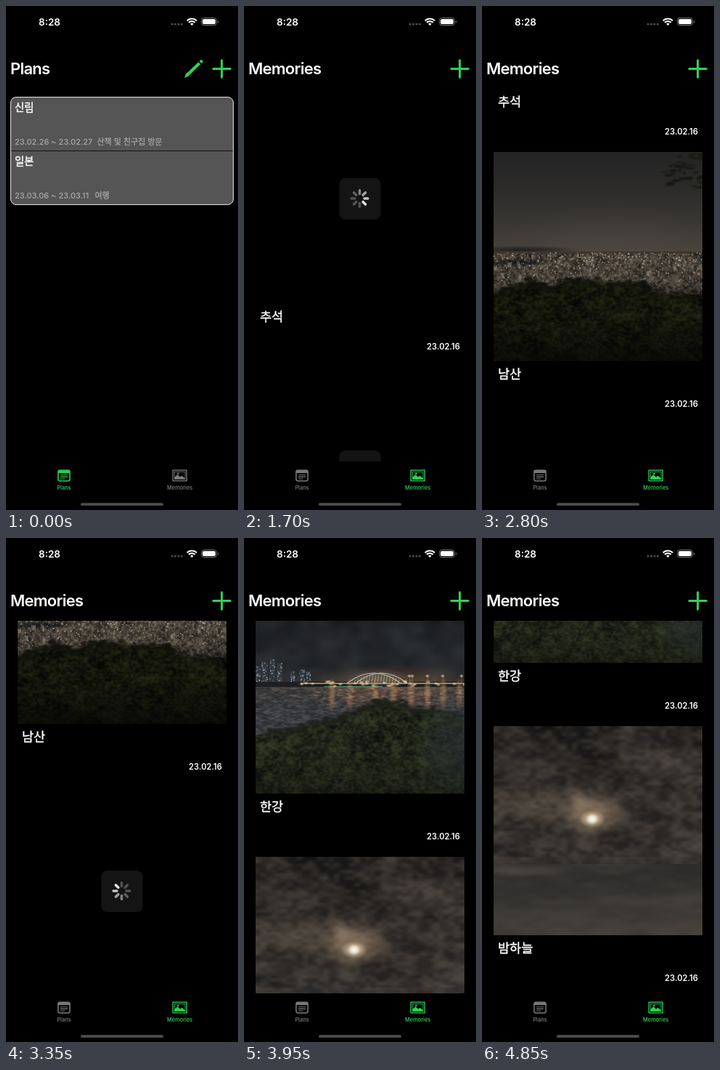
An HTML page with a canvas for the animation above (4900 ms loop, 320x694 px).

```html
<!DOCTYPE html>
<html lang="ko">
<head>
<meta charset="utf-8">
<title>Plans and Memories</title>
<style>
  html, body { margin: 0; width: 100%; height: 100%; overflow: hidden; background: #000; }
  #stage { position: relative; width: 320px; height: 694px; overflow: hidden; }
  #stage > svg { position: absolute; left: 0; top: 0; }
  #view { position: absolute; left: 0; top: 114px; width: 320px; height: 513px; overflow: hidden; }
  #photos { position: absolute; left: 16px; top: 8px; }
  canvas { position: absolute; left: 0; display: block; }
  text { font-family: Inter, "Noto Sans CJK KR", "Noto Sans CJK", sans-serif; fill: #fff; }
  .ko { font-family: "Noto Sans CJK KR", "Noto Sans CJK", sans-serif; font-weight: 400; stroke: #fff; stroke-width: .4px; }
  .title { font-size: 22px; font-weight: 600; letter-spacing: -.75px; }
  .plan { font-size: 14.3px; }
  .sub { font-size: 11px; font-weight: 500; fill: #a9a9a9; }
  .sub.ko { stroke: #a9a9a9; stroke-width: .25px; }
  .name { font-size: 17.5px; }
  .date { font-size: 11.2px; font-weight: 600; text-anchor: end; }
  .tab text { font-size: 7.4px; font-weight: 500; text-anchor: middle; fill: currentColor; }
</style>
</head>
<body>
<div id="stage">
  <div id="view"><div id="photos"></div></div>
  <svg width="320" height="694" viewBox="0 0 320 694" fill="none">
    <clipPath id="clip"><rect y="114" width="320" height="513"/></clipPath>

    <text x="60" y="27" font-size="13.5" font-weight="600" text-anchor="middle">8:28</text>
    <g fill="#4b4b4b">
      <circle cx="229" cy="25" r="1.6"/><circle cx="233.5" cy="25" r="1.6"/>
      <circle cx="238" cy="25" r="1.6"/><circle cx="242.4" cy="25" r="1.6"/>
    </g>
    <g stroke="#fff" stroke-width="2.1">
      <path d="M249.7 20.2a9.6 9.6 0 0 1 13.4 0M252 22.8a6.2 6.2 0 0 1 8.8 0"/>
      <path d="M254.2 24.6a3.2 3.2 0 0 1 4.4 0L256.4 27z" fill="#fff" stroke="none"/>
    </g>
    <rect x="269.5" y="16.5" width="21" height="10" rx="3.2" stroke="#777"/>
    <rect x="271" y="18" width="18" height="7" rx="2" fill="#fff"/>
    <path d="M292 20v3.4q1.3-.5 1.3-1.7t-1.3-1.7z" fill="#777"/>

    <text id="title" class="title" x="6" y="94"></text>
    <path d="M285.9 86.5h23.4M297.6 74.8v23.4" stroke="#30d158" stroke-width="3" stroke-linecap="round"/>

    <g id="plans">
      <path d="M246 99l2-5.2 17.4-16.6 3 3-17.2 16.6zM266.6 76.1l1.6-1.5q1.2-1 2.4.1l.6.6q1 1.1 0 2.2l-1.6 1.6z" fill="#30d158"/>
      <rect x="6.5" y="125.5" width="307" height="148" rx="7.5" fill="#555" stroke="#e8e8e8"/>
      <path d="M7 199.5h306" stroke="#111"/>
      <text class="ko plan" x="12" y="145">신림</text>
      <text class="sub" x="12" y="190.5">23.02.26 ~ 23.02.27</text>
      <text class="sub ko" x="125.5" y="190.5">산책 및 친구집 방문</text>
      <text class="ko plan" x="12" y="219">일본</text>
      <text class="sub" x="12" y="265">23.03.06 ~ 23.03.11</text>
      <text class="sub ko" x="122.5" y="265">여행</text>
    </g>

    <g clip-path="url(#clip)"><g id="feed"></g></g>

    <g class="tab" id="tabPlans">
      <rect x="71.9" y="639.3" width="16.2" height="14.6" rx="2.4" stroke="currentColor" stroke-width="1.5"/>
      <path d="M72 641.6h16" stroke="currentColor" stroke-width="3"/>
      <path d="M75 645.8h10M75 648.4h10M75 651h6.5" stroke="currentColor" stroke-width="1.1"/>
      <text x="80" y="665.6">Plans</text>
    </g>
    <g class="tab" id="tabMem">
      <rect x="230.2" y="639.2" width="19" height="14.6" stroke="currentColor" stroke-width="1.3"/>
      <rect x="232.4" y="641.4" width="14.6" height="10.2" stroke="currentColor" stroke-width=".8"/>
      <path d="M232.5 651.5v-2.7l4-3.6 3.6 3.3 2.4-1.8 4.4 3.6v1.2z" fill="currentColor"/>
      <circle cx="237.4" cy="644" r="1.3" fill="currentColor"/>
      <text x="239.7" y="665.6">Memories</text>
    </g>
    <rect x="103" y="684.3" width="114" height="3.8" rx="1.9" fill="#4c4c4c"/>
  </svg>
</div>
<script>
const LOOP = 4900, SWITCH = 650, LISTED = 1150, PITCH = 375, SIZE = 288;
const GREEN = '#30d158', GRAY = '#7c7c7c';
const $ = id => document.getElementById(id);

let seed = 7;
const rnd = (a = 0, b = 1) => {
  seed = (seed * 16807) % 2147483647;
  return a + (b - a) * seed / 2147483647;
};
const times = (n, fn) => { for (let i = 0; i < n; i++) fn(i); };

function blob(c, x, y, rx, ry, rgb, a) {
  c.save();
  c.translate(x, y);
  c.scale(rx, ry);
  const g = c.createRadialGradient(0, 0, 0, 0, 0, 1);
  g.addColorStop(0, `rgba(${rgb},${a})`);
  g.addColorStop(.5, `rgba(${rgb},${a * .62})`);
  g.addColorStop(1, `rgba(${rgb},0)`);
  c.fillStyle = g;
  c.fillRect(-1, -1, 2, 2);
  c.restore();
}
function fade(c, y0, y1, ...colors) {
  const g = c.createLinearGradient(0, y0, 0, y1);
  colors.forEach((k, i) => g.addColorStop(i / (colors.length - 1), k));
  c.fillStyle = g;
  c.fillRect(0, y0, SIZE, y1 - y0);
}
function dot(c, x, y, w, h, color) {
  c.fillStyle = color;
  c.fillRect(x, y, w, h);
}
function trace(c, pts) {
  c.beginPath();
  pts.forEach(p => c.lineTo(...p));
  c.closePath();
}

// cloudy texture: layers of random pixels, each finer than the last, smoothly enlarged
function mottle(c, y0, y1, cells, layers, light, dark, a, flat = 1) {
  c.imageSmoothingQuality = 'high';
  times(layers, i => {
    const tile = document.createElement('canvas');
    const w = tile.width = cells * 2 ** i;
    const h = tile.height = Math.max(2, Math.round(w * flat * (y1 - y0) / SIZE));
    const t = tile.getContext('2d');
    times(w * h, k => dot(t, k % w, k / w | 0, 1, 1, `rgba(${rnd() < .5 ? light : dark},${rnd(0, a)})`));
    c.drawImage(tile, 0, y0, SIZE, y1 - y0);
  });
}

// dark leafy mass under a ragged skyline
function canopy(c, line, base, light, dark, a) {
  const shape = [...line, [SIZE, SIZE], [0, SIZE]];
  const top = Math.min(...line.map(p => p[1]));
  c.save();
  c.filter = 'blur(3px)';
  c.fillStyle = `rgb(${base})`;
  trace(c, shape);
  c.fill();
  c.filter = 'none';
  c.clip();
  mottle(c, top, SIZE, 12, 4, light, dark, a, 1.3);
  c.restore();
  times(80, () => {
    const i = Math.floor(rnd(0, line.length - 1)), u = rnd();
    const [p, q] = [line[i], line[i + 1]];
    blob(c, p[0] + (q[0] - p[0]) * u, p[1] + (q[1] - p[1]) * u + rnd(-5, 5), rnd(4, 9), rnd(2, 5), base, .9);
  });
}

function moon(c) {
  c.fillStyle = '#000';
  c.fillRect(0, 0, SIZE, SIZE);
  c.save();
  c.beginPath();
  c.arc(127, 116, 121, 0, 7);
  c.clip();
  c.fillStyle = '#808080';
  c.fillRect(0, 0, SIZE, SIZE);
  blob(c, 132, 160, 75, 58, '245,245,245', .95);
  blob(c, 60, 190, 50, 35, '185,185,185', .5);
  [[28, 125, 28, 36], [50, 95, 30, 28], [95, 76, 36, 30], [145, 82, 30, 28], [180, 100, 28, 26],
   [220, 100, 15, 20], [192, 130, 24, 18], [70, 40, 50, 30], [160, 40, 45, 30], [58, 140, 26, 18]]
    .forEach(([x, y, rx, ry]) => blob(c, x, y, rx, ry, '35,35,35', .72));
  mottle(c, 0, SIZE, 14, 4, '235,235,235', '40,40,40', .28);
  fade(c, 190, 246, 'rgba(0,0,0,0)', 'rgba(0,0,0,.55)', 'rgba(0,0,0,.8)');
  const limb = c.createRadialGradient(127, 116, 95, 127, 116, 121);
  limb.addColorStop(0, 'rgba(0,0,0,0)');
  limb.addColorStop(.7, 'rgba(0,0,0,.3)');
  limb.addColorStop(1, '#000');
  c.fillStyle = limb;
  c.fillRect(0, 0, SIZE, SIZE);
  c.restore();
  c.filter = 'blur(2px)';
  c.fillStyle = '#444';
  trace(c, [[62, 212], [95, 206], [118, 222], [135, 240], [112, 240], [85, 228]]);
  c.fill();
  c.fillStyle = '#050505';
  trace(c, [[100, 203], [114, 209], [126, 222], [155, 231], [134, 238], [118, 224]]);
  c.fill();
}

function city(c) {
  fade(c, 0, 139, '#242424', '#2b2a29', '#373532', '#48433c');
  blob(c, 165, 128, 150, 60, '92,84,72', .25);
  times(60, () => {
    const x = rnd(235, 290), y = rnd(2, 50);
    if (x + y > 262) blob(c, x, y, rnd(3, 9), rnd(1, 4), '20,22,15', .75);
  });
  blob(c, 40, 135, 80, 6, '24,24,23', .8);
  fade(c, 137, 205, '#3b352e', '#39342d', '#201e1a');
  mottle(c, 140, 200, 36, 3, '125,112,95', '22,21,20', .5);
  blob(c, 30, 152, 55, 6, '18,19,22', .95);
  const tints = ['255,235,205', '255,248,235', '245,195,135', '205,218,250', '225,165,115'];
  times(750, i => {
    const s = rnd(.6, 1.7);
    dot(c, rnd(0, SIZE), 138 + rnd() * rnd(6, 58), s, s, `rgba(${tints[i % 5]},${rnd(.15, .75)})`);
  });
  times(90, () => {
    const v = rnd(75, 165) | 0;
    dot(c, rnd(0, SIZE), rnd(146, 180), rnd(1.5, 4), rnd(3, 7), `rgba(${v},${v - 8},${v - 18},.5)`);
  });
  canopy(c, [[0, 193], [25, 187], [52, 178], [78, 188], [105, 177], [150, 179], [205, 182],
    [218, 192], [245, 198], [288, 196]], '15,16,10', '46,49,24', '3,4,3', .5);
  fade(c, 225, SIZE, 'rgba(7,8,5,0)', 'rgba(7,8,5,.75)');
}

function bridge(c) {
  fade(c, 0, 140, '#17191c', '#1b1d20', '#24262a', '#2e2f31');
  mottle(c, 0, 135, 5, 3, '58,61,66', '18,20,23', .3, 1.5);
  fade(c, 139, 225, '#3c3937', '#33363b', '#262c33');
  blob(c, 190, 142, 130, 32, '150,98,62', .5);

  [[0, 112, 7], [8, 106, 9], [19, 102, 8], [29, 108, 8], [48, 120, 6], [60, 117, 8], [70, 119, 6]].forEach(([x, y, w]) => {
    dot(c, x, y - 50 + 50, w, 139 - y, '#30363c');
    times(w * 3, () => dot(c, x + rnd(0, w - 1), rnd(y, 136), 1.3, 1.2, `rgba(205,220,230,${rnd(.3, .85)})`));
  });
  dot(c, 0, 134, SIZE, 7, '#1d1f20');
  blob(c, 170, 130, 45, 14, '170,165,145', .3);
  c.strokeStyle = '#cfc8b2';
  c.lineWidth = 1.2;
  [[126, 74], [138, 71]].forEach(([x, w]) => {
    c.beginPath();
    c.moveTo(x, 136);
    c.quadraticCurveTo(x + w / 2, 108, x + w, 136);
    c.stroke();
  });
  c.lineWidth = .5;
  times(18, i => {
    const x = 132 + i * 4;
    c.beginPath();
    c.moveTo(x, 137);
    c.lineTo(x + 2, 123 + (i - 8.5) ** 2 / 7);
    c.stroke();
  });
  dot(c, 62, 135.5, 226, 1.4, '#c9a377');
  dot(c, 95, 140, 80, 1.3, '#4d8a67');
  times(30, () => blob(c, rnd(62, SIZE), rnd(133, 140), 3.5, 2.2, '255,215,160', .75));
  [212, 216, 237, 258, 284].forEach(x => {
    dot(c, x, 125, .8, 12, '#6f6251');
    blob(c, x, 126, 3, 2.4, '255,225,185', .7);
  });
  [105, 130, 165, 190, 214, 237, 259, 281].forEach(x => blob(c, x, 152, 6, 24, '235,170,110', .6));
  mottle(c, 142, 222, 40, 2, '120,112,108', '30,34,40', .4, 3);
  times(220, () => {
    const y = rnd(142, 178);
    dot(c, rnd(80, SIZE), y, rnd(2, 6), .9, `rgba(${rnd() < .6 ? '225,165,110' : '50,50,54'},${(184 - y) / 75})`);
  });

  canopy(c, [[0, 208], [30, 203], [60, 198], [88, 191], [115, 184], [140, 176], [155, 168], [172, 162],
    [200, 163], [215, 172], [250, 174], [288, 180]], '28,31,24', '68,74,46', '9,11,9', .45);
  blob(c, 288, 225, 75, 80, '42,50,56', .65);
  fade(c, 225, SIZE, 'rgba(18,20,13,0)', 'rgba(18,20,13,.4)');
}

function clouds(c) {
  fade(c, 0, SIZE, '#1b1b1c', '#2a2725', '#3c3732', '#343231', '#343332', '#46413a');
  [[45, 60, 90, 24, '66,60,54'], [45, 105, 110, 30, '92,82,72'], [130, 115, 80, 36, '112,98,84'],
   [230, 45, 90, 22, '56,52,48'], [245, 82, 80, 24, '32,30,28'], [225, 122, 80, 28, '28,26,24'],
   [195, 152, 90, 18, '30,28,26'], [65, 135, 70, 12, '42,38,34'], [40, 200, 70, 9, '84,79,73'],
   [150, 40, 60, 22, '22,22,22'], [100, 12, 80, 25, '14,15,18'],
   [210, 205, 100, 28, '44,43,42'], [135, 182, 40, 14, '72,70,66'], [210, 240, 110, 10, '70,65,58']]
    .forEach(([x, y, rx, ry, k]) => blob(c, x, y, rx, ry, k, .75));
  mottle(c, 0, 190, 5, 4, '98,88,77', '19,18,18', .3, 1.6);
  mottle(c, 180, SIZE, 4, 3, '80,76,70', '38,37,36', .2, 3);
  blob(c, 138, 122, 46, 30, '190,158,126', .5);
  blob(c, 118, 102, 14, 18, '165,140,115', .45);
  blob(c, 136, 128, 18, 12, '255,228,190', .7);
  blob(c, 136, 128, 9, 8, '255,253,240', 1);
}

// phase: heading of the brightest spoke at time zero, in eighths of a turn
const rows = [
  { name: '추석', paint: moon, ready: 1900, phase: -10.6 },
  { name: '남산', paint: city, ready: 1950, phase: -10.6 },
  { name: '한강', paint: bridge, ready: 3500, phase: -19.8 },
  { name: '밤하늘', paint: clouds, ready: 3850, phase: -19.8 }
];

rows.forEach((row, i) => {
  const y = 122 + i * PITCH;
  const canvas = row.canvas = document.createElement('canvas');
  canvas.width = canvas.height = SIZE;
  canvas.style.top = i * PITCH + 'px';
  row.paint(canvas.getContext('2d'));
  $('photos').append(canvas);

  let spokes = '';
  times(8, k => spokes += `<path d="M0-6.6V-11.3" transform="rotate(${k * 45})"/>`);
  $('feed').insertAdjacentHTML('beforeend', `
    <g id="spin${i}" transform="translate(160 ${y + 143.5})">
      <rect x="-28.5" y="-28.5" width="57" height="57" rx="8" fill="#141414"/>
      <g transform="translate(-.5 -.5)" stroke="#e6e6e6" stroke-width="3.6" stroke-linecap="round">${spokes}</g>
    </g>
    <text class="ko name" x="22" y="${y + 312}">${row.name}</text>
    <text class="date" x="298" y="${y + 350.5}">23.02.16</text>`);
  row.spin = $('spin' + i);
  row.spokes = [...row.spin.querySelectorAll('path')];
});

const glide = (t, from, reach) => from + reach * (1 - Math.exp(-t / 500));

// two flicks, each a drag followed by inertial slowing
function scroll(t) {
  if (t < 2380) return 0;
  if (t < 2550) return 81 * ((t - 2380) / 170) ** 2;
  if (t < 2700) return 81 + 137 * (t - 2550) / 150;
  if (t < 3500) return glide(t - 2700, 218, 427);
  if (t < 3850) {
    const u = (t - 3500) / 350, a = 559, b = 760, va = 60, vb = 185;
    const d = b - a;
    return a + va * u + (3 * d - 2 * va - vb) * u * u + (va + vb - 2 * d) * u ** 3;
  }
  return glide(t - 3850, 760, 264);
}

const show = (el, on) => { el.style.visibility = on ? 'visible' : 'hidden'; };

function draw(t) {
  const memories = t >= SWITCH, listed = t >= LISTED;
  const shift = -Math.round(scroll(t));
  $('title').textContent = memories ? 'Memories' : 'Plans';
  $('plans').style.display = memories ? 'none' : '';
  $('feed').style.display = listed ? '' : 'none';
  $('tabPlans').style.color = memories ? GRAY : GREEN;
  $('tabMem').style.color = memories ? GREEN : GRAY;
  $('feed').setAttribute('transform', `translate(0 ${shift})`);
  $('photos').style.transform = `translateY(${shift}px)`;
  rows.forEach(row => {
    const ready = t >= row.ready;
    show(row.canvas, ready);
    show(row.spin, !ready);
    if (ready) return;
    const head = Math.floor(t / 125 + row.phase + .01);
    row.spokes.forEach((s, k) => {
      const lag = (((head - k) % 8) + 8) % 8;
      s.setAttribute('opacity', Math.max(.3, 1 - lag * .16));
    });
  });
}

const start = performance.now();
function tick() {
  draw((performance.now() - start) % LOOP);
  requestAnimationFrame(tick);
}
draw(0);
requestAnimationFrame(tick);
</script>
</body>
</html>
```
